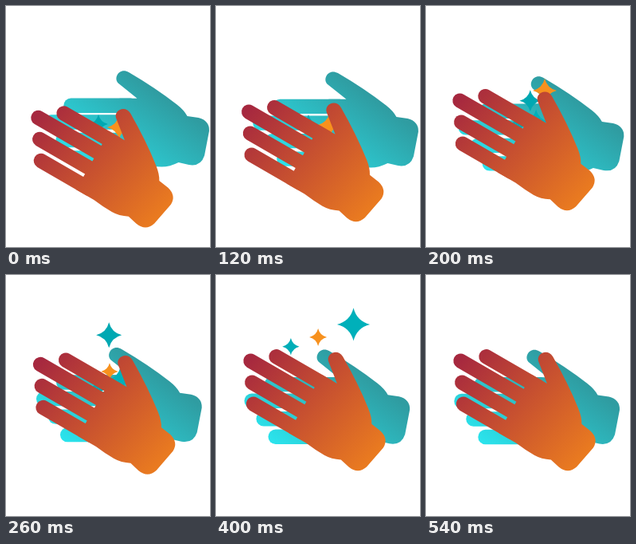
Recreate the animation shown at these times as an HTML page with a canvas. Size 256x302 px, loop 0.78 s.

```html
<!DOCTYPE html>
<html lang="en">
<head>
<meta charset="utf-8">
<title>Clapping hands</title>
<style>
  html, body { margin: 0; width: 100%; height: 100%; overflow: hidden; background: #fff; }
  canvas { display: block; }
</style>
</head>
<body>
<canvas id="stage" width="256" height="302"></canvas>
<script>
const ctx = document.getElementById('stage').getContext('2d');
const LOOP = 780, STEP = 20, REST = 540;

const clamp = v => Math.min(1, Math.max(0, v));
const mix = (a, b, p) => a + (b - a) * p;
const easeOut = u => 1 - (1 - clamp(u)) ** 3;

// Cubic Bezier timing with a flat start and end, solved by bisection.
function ease(u) {
  u = clamp(u);
  let low = 0, high = 1;
  for (let i = 0; i < 24; i++) {
    const s = (low + high) / 2, r = 1 - s;
    const x = 3 * r * r * s * 0.46 + 3 * r * s * s * 0.32 + s * s * s;
    if (x < u) low = s; else high = s;
  }
  return low * low * (3 - 2 * low);
}

function gradient(x0, y0, x1, y1, from, to) {
  const g = ctx.createLinearGradient(x0, y0, x1, y1);
  g.addColorStop(0, from);
  g.addColorStop(1, to);
  return g;
}

const ORANGE = gradient(0, -14, 191, 31, '#a6283f', '#e97a20');
const TEAL = gradient(40, 62, 120, -48, '#2be3ec', '#2f9ca1');

// Hand space: origin at the middle fingertip, fingers pointing left.
const FINGERS = [[25, -20.7], [0, 0], [15, 22.5], [30, 45]];
const PALM = new Path2D(`M86 -29.8 L108 -29.8 L85 -48.2
  C77 -55 86 -69 97.5 -62.5 Q131 -43 158 -22 Q167 -15 171 -7.5
  L185 -5.5 Q199 -2 198.5 11 L192.5 42 Q188 56 173 53.5 L160 50.5
  Q149 56 139 56 Q126 56 112 54.2 L86 54.2 Z`);

function drawHand(x, y, angle, paint) {
  ctx.save();
  ctx.translate(x, y);
  ctx.rotate(angle);
  ctx.fillStyle = ctx.strokeStyle = paint;
  ctx.lineWidth = 18.4;
  ctx.lineCap = 'round';
  for (const [fx, fy] of FINGERS) {
    ctx.beginPath();
    ctx.moveTo(fx, fy);
    ctx.lineTo(100, fy);
    ctx.stroke();
  }
  ctx.fill(PALM);
  ctx.restore();
}

const SPARKS = [
  { color: '#00a8b2', from: [116, 148], to: [104, 84], size: [12, 10], start: 220, span: 200, show: 0, hide: 385 },
  { color: '#00b0ba', from: [138, 145], to: [175, 56], size: [15, 21], start: 187, span: 290, show: 200, hide: 520 },
  { color: '#00a8b2', from: [132, 151], to: [128, 42], size: [11.5, 18], start: 91, span: 330, show: 140, hide: 395 },
  { color: '#00aeb8', from: [104, 116], to: [89, 77], size: [9, 11.5], start: 280, span: 240, show: 300, hide: 500 },
  { color: '#f7911e', from: [131, 145], to: [128, 75], size: [10.5, 11], start: 146, span: 325, show: 220, hide: 500 },
  { color: '#f7911e', from: [142, 152], to: [159, 40], size: [15, 15], start: 86, span: 300, show: 0, hide: 255 },
];

function drawSpark(spark, t) {
  if (t < spark.show || t >= spark.hide) return;
  const p = ease((t - spark.start) / spark.span);
  const x = mix(spark.from[0], spark.to[0], p);
  const y = mix(spark.from[1], spark.to[1], p);
  const r = mix(...spark.size, p) * clamp((spark.hide - t) / 40);
  const c = r * 0.2;
  ctx.fillStyle = spark.color;
  ctx.beginPath();
  ctx.moveTo(x, y - r);
  ctx.quadraticCurveTo(x + c, y - c, x + r, y);
  ctx.quadraticCurveTo(x + c, y + c, x, y + r);
  ctx.quadraticCurveTo(x - c, y + c, x - r, y);
  ctx.quadraticCurveTo(x - c, y - c, x, y - r);
  ctx.fill();
}

function draw(now) {
  const t = Math.min(REST, Math.floor((now % LOOP) / STEP) * STEP);
  const back = easeOut((t - 108) / 390);
  const front = ease(t / 405);

  ctx.fillStyle = '#fff';
  ctx.fillRect(0, 0, 256, 302);
  drawHand(mix(56.5, 44.5, back), mix(145.5, 158, back), 0, TEAL);
  SPARKS.forEach(spark => drawSpark(spark, t));
  drawHand(mix(40.5, 43.5, front), mix(140, 107.7, front), Math.PI / 6, ORANGE);
}

const began = performance.now();
function tick() {
  draw(performance.now() - began);
  requestAnimationFrame(tick);
}
tick();
</script>
</body>
</html>
```
